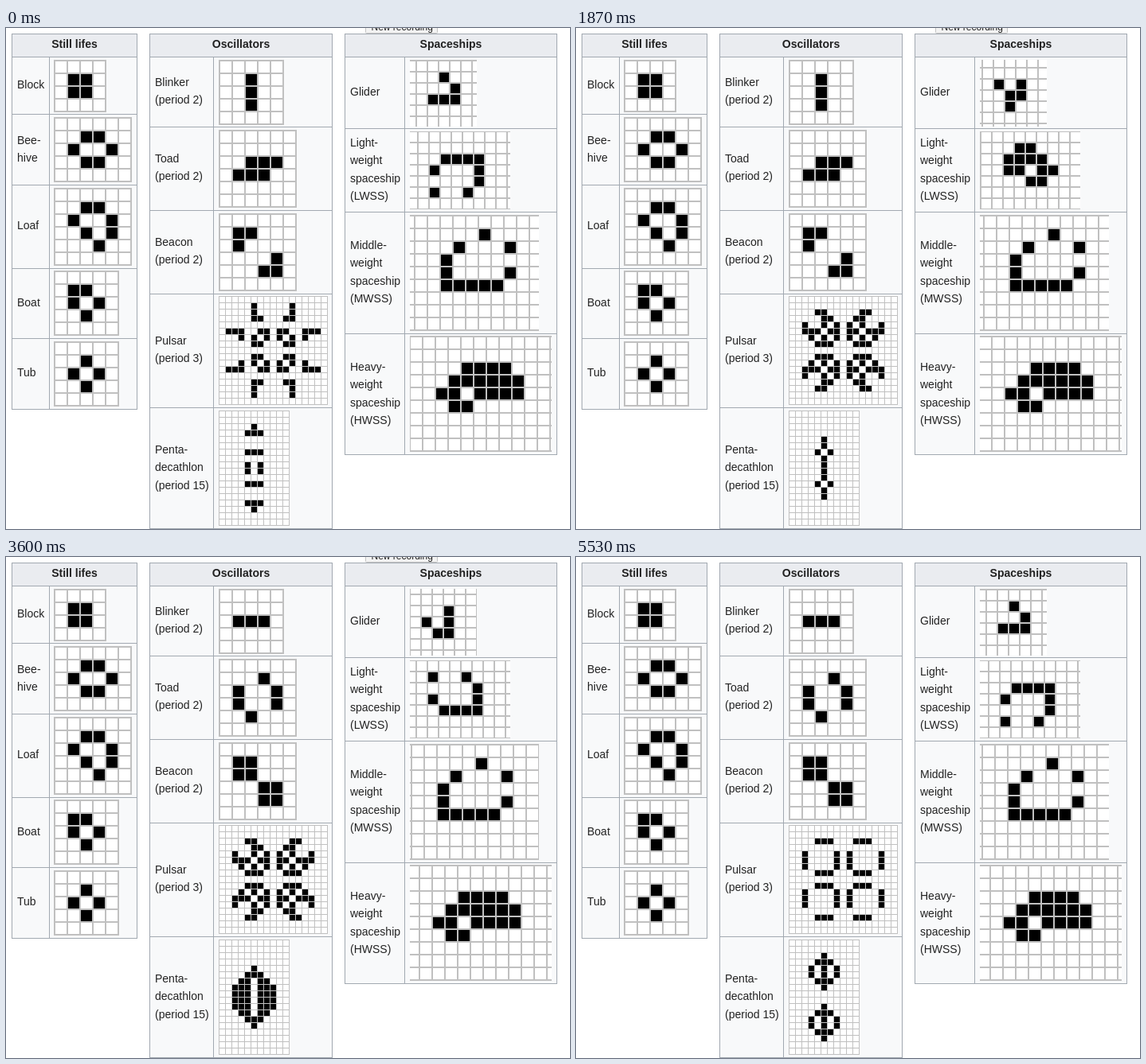
Animation, 708 px wide and 630 px high, one loop 5.56 s. Source, as an HTML page with a canvas:

```html
<!DOCTYPE html>
<html lang="en">
<head>
<meta charset="utf-8">
<title>Game of Life patterns</title>
<style>
  html, body { margin: 0; width: 708px; height: 630px; overflow: hidden; background: #fff; }
  canvas, svg { position: absolute; left: 0; top: 0; }
  text { font: 14px "Liberation Sans", Arial, sans-serif; fill: #222; }
  .head { font-weight: bold; text-anchor: middle; }
  #tip text { font-size: 12px; }
</style>
</head>
<body>
<canvas id="stage" width="708" height="630"></canvas>
<svg id="labels" width="708" height="630">
  <g id="tip">
    <rect x="451.5" y="-14.5" width="90" height="21" rx="1" fill="#f3f3f3" stroke="#c4c4c4"/>
    <text x="458.5" y="3">New recording</text>
  </g>
</svg>
<script>
const LOOP = 5560, TIP_END = 4900;
const ctx = document.getElementById('stage').getContext('2d');
const svg = document.getElementById('labels');
const tip = document.getElementById('tip');

// --- Game of Life ---
function parse(rows, x0 = 0, y0 = 0) {
  const cells = [];
  rows.split('/').forEach((row, y) =>
    [...row].forEach((c, x) => c === 'o' && cells.push([x + x0, y + y0])));
  return cells;
}

function step(cells) {
  const live = new Set(cells.map(String)), sum = {};
  for (const [x, y] of cells)
    for (let i = -1; i < 2; i++)
      for (let j = -1; j < 2; j++) {
        const key = [x + i, y + j];
        sum[key] = (sum[key] || 0) + 1;
      }
  return Object.keys(sum)
    .filter(k => sum[k] === 3 || sum[k] === 4 && live.has(k))
    .map(k => k.split(',').map(Number));
}

function phases(seed, count) {
  const list = [seed];
  while (list.length < count) list.push(step(list[list.length - 1]));
  return list;
}

// --- Boards ---
const boards = [];

// A fixed grid with a closed border; shift sets the phase at the start.
function grid(x, y, cols, rows, seed, period = 1, shift = 0, pitch = 16) {
  const line = pitch / 8;
  const list = phases(seed, period);
  boards.push({
    x, y, w: cols * pitch + line, h: rows * pitch + line, pitch, line,
    at: t => ({ cells: list[(Math.floor(t * 2 + 0.57) + shift) % period], ox: 0, oy: 0 })
  });
}

// A grid that scrolls pixel by pixel along with the ship.
function ship(x, y, w, h, pitch, seed, { speed, start, cycle, ox, oy, dx, dy = 0 }) {
  const list = phases(parse(seed), 4);
  boards.push({
    x, y, w, h, pitch, line: 2,
    at: t => {
      const p = Math.floor(speed * t + start) % cycle;
      return { cells: list[Math.floor(p * 4 / cycle)], ox: ox + dx * p, oy: oy + dy * p };
    }
  });
}

const pulsar = [];
for (const i of [4, 5, 6, 10, 11, 12])
  for (const j of [2, 7, 9, 14]) pulsar.push([i, j], [j, i]);

grid(60, 40, 4, 4, parse('oo/oo', 1, 1));
grid(60, 112, 6, 5, parse('.oo./o..o/.oo.', 1, 1));
grid(60, 201, 6, 6, parse('.oo./o..o/.o.o/..o.', 1, 1));
grid(60, 305, 5, 5, parse('oo./o.o/.o.', 1, 1));
grid(60, 394, 5, 5, parse('.o./o.o/.o.', 1, 1));

grid(267, 40, 5, 5, parse('o/o/o', 2, 1), 2);
grid(267, 128, 6, 6, parse('.ooo/ooo.', 1, 2), 2);
grid(267, 233, 6, 6, parse('oo../o.../...o/..oo', 1, 1), 2);
grid(267, 337, 17, 17, pulsar, 3, 1, 8);
grid(267, 481, 11, 18, parse('.o./.o./o.o/.o./.o./.o./.o./o.o/.o./.o.', 4, 4), 15, 11, 8);

ship(507, 40, 84, 84, 14, '.o./..o/ooo',
  { speed: 10.03, start: 0.7, cycle: 14, ox: 21, oy: 14, dx: -1, dy: -1 });
ship(507, 130, 126, 98, 14, '.oooo/o...o/....o/o..o.',
  { speed: 20.05, start: 4.45, cycle: 28, ox: 27, oy: 27, dx: -1 });
ship(507, 235, 162, 146, 16, '...o../.o...o/o...../o....o/ooooo.',
  { speed: 16.75, start: 5.58, cycle: 32, ox: 32, oy: 16, dx: 1 });
ship(507, 387, 178, 146, 16, '...oo../.o....o/o....../o.....o/oooooo.',
  { speed: 16.75, start: 31.58, cycle: 32, ox: 32, oy: 16, dx: 1 });

// --- Tables: left, divider and right edge, row lines, title, labels with first baseline ---
const tables = [
  { xs: [7, 54, 164], ys: [7, 36, 108, 197, 302, 390, 479], title: 'Still lifes',
    rows: [[76, 'Block'], [146, 'Bee-', 'hive'], [253, 'Loaf'], [350, 'Boat'], [438, 'Tub']] },
  { xs: [180, 260, 409], ys: [7, 36, 124, 229, 334, 477, 629], title: 'Oscillators',
    rows: [[73, 'Blinker', '(period 2)'], [169, 'Toad', '(period 2)'], [274, 'Beacon', '(period 2)'],
      [398, 'Pulsar', '(period 3)'], [535, 'Penta-', 'decathlon', '(period 15)']] },
  { xs: [425, 500, 691], ys: [7, 36, 126, 231, 384, 536], title: 'Spaceships',
    rows: [[85, 'Glider'], [149, 'Light-', 'weight', 'spaceship', '(LWSS)'],
      [278, 'Middle-', 'weight', 'spaceship', '(MWSS)'],
      [431, 'Heavy-', 'weight', 'spaceship', '(HWSS)']] }
];

function label(x, y, str, cls = '') {
  const el = document.createElementNS(svg.namespaceURI, 'text');
  el.setAttribute('x', x);
  el.setAttribute('y', y);
  el.setAttribute('class', cls);
  el.textContent = str;
  svg.append(el);
}

for (const { xs, title, rows } of tables) {
  label((xs[0] + xs[2] + 1) / 2, 25, title, 'head');
  for (const [y, ...lines] of rows)
    lines.forEach((s, i) => label(xs[0] + 7, y + Math.round(22.3 * i), s));
}

// --- Drawing ---
function box(color, x, y, w, h) {
  ctx.fillStyle = color;
  ctx.fillRect(x, y, w, h);
}

function drawTable({ xs: [l, m, r], ys }) {
  const top = ys[0], body = ys[1], bottom = ys[ys.length - 1];
  box('#f8f9fa', l, top, r - l, bottom - top);
  box('#eaecf0', l, top, r - l, body - top);
  for (const y of ys) box('#a2a9b1', l, y, r - l + 1, 1);
  for (const x of [l, r]) box('#a2a9b1', x, top, 1, bottom - top);
  box('#a2a9b1', m, body, 1, bottom - body);
}

function drawBoard({ x, y, w, h, pitch, line, at }, t) {
  const { cells, ox, oy } = at(t);
  ctx.save();
  ctx.translate(x, y);
  ctx.beginPath();
  ctx.rect(0, 0, w, h);
  ctx.clip();
  box('#fff', 0, 0, w, h);
  for (let i = ox % pitch - pitch; i < w; i += pitch) box('#c0c0c0', i, 0, line, h);
  for (let i = oy % pitch - pitch; i < h; i += pitch) box('#c0c0c0', 0, i, w, line);
  for (const [cx, cy] of cells)
    box('#000', ox + cx * pitch + line, oy + cy * pitch + line, pitch - line, pitch - line);
  ctx.restore();
}

const begin = performance.now();
function draw() {
  const ms = (performance.now() - begin) % LOOP;
  box('#fff', 0, 0, 708, 630);
  tables.forEach(drawTable);
  boards.forEach(b => drawBoard(b, ms / 1000));
  tip.style.display = ms < TIP_END ? '' : 'none';
  requestAnimationFrame(draw);
}
draw();
</script>
</body>
</html>
```
